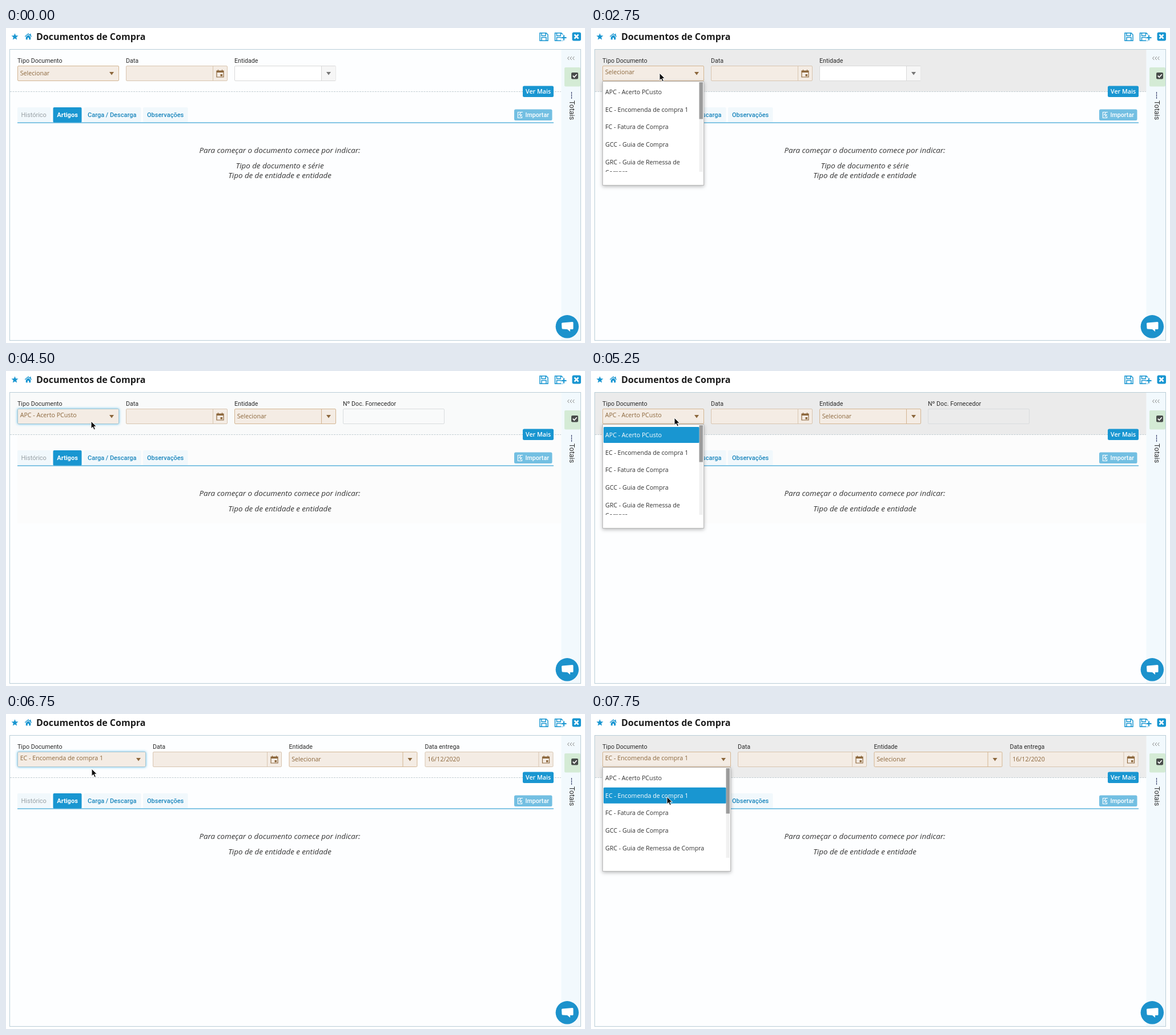
An HTML page that plays this animation: 1014x552 px, repeating every 8000 ms.

```html
<!DOCTYPE html>
<html lang="pt">
<head>
<meta charset="utf-8">
<title>Documentos de Compra</title>
<style>
html, body { margin: 0; width: 100%; height: 100%; overflow: hidden; background: #fff; }
svg { display: block; width: 1014px; height: 552px; }
text { font: 10.66px "Open Sans", "Noto Sans", sans-serif; white-space: pre; }
.label { font-family: Roboto, sans-serif; fill: #2b2b2b; }
.tab { font: 500 11px Roboto, sans-serif; fill: #1a86bd; }
.title { font-weight: 700; font-size: 16px; fill: #1c1c1c; }
.hint { font-style: italic; font-size: 13.33px; fill: #333; text-anchor: middle; }
.btn { font-weight: 600; fill: #fff; }
.side { font: 12.44px Roboto, sans-serif; fill: #333; }
</style>
</head>
<body>
<svg id="stage" viewBox="0 0 1014 552">
  <defs>
    <filter id="shadow" x="-10%" y="-10%" width="120%" height="120%">
      <feDropShadow dx="0" dy="2" stdDeviation="3" flood-opacity=".28"/>
    </filter>
    <filter id="glow" x="-10%" y="-40%" width="120%" height="180%">
      <feDropShadow dx="0" dy="0" stdDeviation="2.2" flood-color="#3aaee6" flood-opacity=".85"/>
    </filter>
    <clipPath id="listClip"><rect x="20" y="94" width="230" height="158"/></clipPath>
  </defs>
  <g id="scene"></g>
</svg>
<script>
const scene = document.getElementById('scene');
const LOOP = 8000, STEP = 250;
const BLUE = '#1996d1', TAN = '#f4ece4', TAN_LINE = '#d3b592', BROWN = '#8c673c';

// time, x, y of the pointer tip
const pointerKeys = [
  [500, 285, 0], [1000, 150, 82], [1500, 87, 146], [2000, 87, 146], [2750, 120, 79],
  [3250, 119, 81], [3750, 114, 112], [4000, 115, 112], [4500, 149, 88], [4750, 149, 88],
  [5250, 146, 82], [5750, 130, 143], [6000, 131, 143], [6500, 150, 96], [6750, 150, 96],
  [7250, 146, 83], [7750, 133, 145]
];
// time, strength of the header shade
const shadeKeys = [
  [2000, 0], [2750, 1], [3250, 1], [3750, 0], [4000, 0], [4500, .28], [5000, 1],
  [5250, 1], [5750, 0], [6250, .3], [6750, 0], [7250, 1], [7500, 1], [7750, .92]
];

function track(keys, t) {
  if (t <= keys[0][0]) return keys[0].slice(1);
  for (let i = 1; i < keys.length; i++) {
    const a = keys[i - 1], b = keys[i];
    if (t <= b[0]) {
      const k = (t - a[0]) / (b[0] - a[0]);
      return a.slice(1).map((v, j) => v + (b[j + 1] - v) * k);
    }
  }
  return keys[keys.length - 1].slice(1);
}

const rect = (x, y, w, h, fill, extra = '') =>
  `<rect x="${x}" y="${y}" width="${w}" height="${h}" fill="${fill}" ${extra}/>`;
const text = (x, y, str, cls = '', fill = '') =>
  `<text x="${x}" y="${y}" class="${cls}" ${fill && `fill="${fill}"`}>${str}</text>`;
const path = (d, fill, extra = '') => `<path d="${d}" fill="${fill}" ${extra}/>`;
const line = (d, color, w = 1, extra = '') =>
  path(d, 'none', `stroke="${color}" stroke-width="${w}" ${extra}`);
const arrow = (x, y, color) => path(`M${x - 4} ${y - 2.5}h8l-4 5.5z`, color);

function calendar(x, y) {
  return line(`M${x - 6} ${y - 5}h12v11h-12zM${x - 3.5} ${y - 7}v2M${x + 3.5} ${y - 7}v2`, BROWN, 1.2) +
    rect(x - 6, y - 5, 12, 3, BROWN) + rect(x + .5, y + 1, 3.5, 3.5, BROWN);
}

function field(x, w, label, o = {}) {
  const fill = o.fill || TAN, edge = o.edge || TAN_LINE;
  const right = x + w, ink = o.ink || BROWN;
  let s = text(x, 60.5, label, 'label');
  s += rect(x + .5, 66.5, w - 1, 26, fill, `rx="1.5" stroke="${edge}" ${o.glow ? 'filter="url(#glow)"' : ''}`);
  if (o.button) {
    if (o.buttonFill) s += rect(right - 25.5, 67, 25, 25, o.buttonFill);
    s += line(`M${right - 25.5} 67v25`, edge);
  }
  if (o.icon === 'date') s += calendar(right - 13, 80);
  if (o.icon === 'arrow') s += arrow(right - 13, 79.5, ink);
  if (o.value) s += text(x + 4.7, o.baseline || 83, o.value, '', ink);
  return s;
}

function disk(x) {
  return line(`M${x} 8.7h11l3 3v10.6h-14zM${x + 3} 9v4.5h7v-4.5M${x + 3} 22v-5.5h8v5.5`, BLUE, 1.5);
}

function topBar() {
  const star = Array.from({ length: 10 }, (_, i) => {
    const a = i * Math.PI / 5, r = i % 2 ? 2.7 : 6.3;
    return (15.5 + r * Math.sin(a)).toFixed(1) + ' ' + (15.5 - r * Math.cos(a)).toFixed(1);
  }).join('L');
  return path(`M${star}z`, BLUE) +
    path('M39 9.3l6.2 5.3-.9 1-5.3-4.5-5.3 4.5-.9-1zM39 12.2l4.2 3.5v4.6h-3v-3.2h-2.4v3.2h-3v-4.6zM42 10h1.6v3.2l-1.6-1.4z', BLUE) +
    text(53, 21, 'Documentos de Compra', 'title') +
    disk(935) + disk(961.5) +
    rect(972, 11.5, 9.5, 11, '#fff') + line('M977 12.5v9M972.5 17h9', BLUE, 2) +
    rect(991.5, 7.5, 15.5, 15, BLUE, 'rx="3"') + line('M995.5 11.5l7 7m0-7l-7 7', '#fff', 2.5);
}

function sidePanel() {
  const chevrons = [983.5, 988, 992.5].map(x => `M${x + 2.8} 50l-2.8 3 2.8 3`).join('');
  return rect(972.5, 38, 33.5, 509, '#f2f9fd') +
    line(chevrons, '#777', .9) +
    rect(978, 69, 28, 33.5, '#d4ebd5', 'rx="2"') +
    rect(990, 78, 12, 11.5, '#484d4a', 'rx="2"') + line('M992.7 83.7l2.5 2.5 4.5-5', '#fff', 1.7) +
    line('M990.5 112v12', '#3c4570', 1.2, 'stroke-dasharray="3.4 .9"') +
    `<text class="side" transform="translate(986.5 127) rotate(90)">Totais</text>`;
}

function tab(x, w, label, tx) {
  return rect(x, 139, w, 26.5, '#f1f8fc', 'rx="2"') +
    text(tx, 156, label, 'tab" style="' + (label === 'Histórico' ? 'fill:#98a0a5;font-weight:400' : ''));
}

function body(hints) {
  return line('M7 111.5H972', '#c3ced3', 1, 'stroke-dasharray="3 1.5"') +
    rect(905, 101.5, 54, 19.5, BLUE, 'rx="2.5"') + text(910, 115, 'Ver Mais', 'btn') +
    tab(20, 58, 'Histórico', 26.5) + tab(136, 100.5, 'Carga / Descarga', 143) +
    tab(240, 78.5, 'Observações', 247) +
    rect(82.5, 139, 50, 27, BLUE, 'rx="2"') +
    text(89.3, 156, 'Artigos', 'tab" style="fill:#fff;font-weight:700') +
    line('M20 166H959', '#5db3dc', 1.6) +
    rect(890, 142.5, 66.5, 19.5, '#73bfe2', 'rx="2.5"') +
    line('M901 147.5h-4.5v10h7v-3M905 147.5h-3l-3 4.5h4l-3 3.5', '#fff', 1.2) +
    text(909.5, 156, 'Importar', 'label" style="fill:#fff;font-weight:500') +
    text(479.5, 219, 'Para começar o documento comece por indicar:', 'hint') +
    hints.map((h, i) => text(479.5, 245.5 + i * 17.8, h, 'hint')).join('');
}

function list(w, picked, hovered) {
  const wide = w > 200, bar = 20 + w - 8.5;
  const items = ['APC - Acerto PCusto', 'EC - Encomenda de compra 1', 'FC - Fatura de Compra',
    'GCC - Guia de Compra', 'GRC - Guia de Remessa de' + (wide ? ' Compra' : '')];
  let s = rect(20.5, 93.5, w - 1, 182, '#fff', 'stroke="#b9b9b9" filter="url(#shadow)"');
  s += rect(bar, 95, 6.5, 157, '#f1f1f1') + rect(bar, 95, 6.5, wide ? 79.5 : 64.5, '#9c9c9c');
  items.forEach((name, i) => {
    const mark = i === picked ? BLUE : i === hovered ? '#999' : '';
    if (mark) s += rect(22, 98 + i * 30.8, bar - 22, 28, mark, 'rx="1.5"');
    s += text(25, 115.8 + i * 30.7, name, '', mark ? '#fff' : '#333');
  });
  if (!wide) s += `<g clip-path="url(#listClip)">${text(25, 257, 'Compra', '', '#333')}</g>`;
  return s;
}

function pointer(x, y) {
  return `<g transform="translate(${x} ${y})">` +
    path('M0 0v13l3-2.8 2 4.8 2.4-1-2-4.7h4z', '#111', 'stroke="#fff" stroke-width="1"') + '</g>';
}

function fields(t, doc, open) {
  const wide = t >= 6500, loaded = t >= 4250, w = wide ? 225 : 178;
  const tan = { button: true, ink: BROWN };
  let s = field(20, w, 'Tipo Documento', {
    value: doc, icon: 'arrow', baseline: t >= 2500 ? 81 : 83,
    glow: t >= 4000 && !open, edge: t >= 4000 && !open ? '#a9c6cf' : TAN_LINE
  });
  const choose = { ...tan, icon: 'arrow', value: 'Selecionar' };
  const date = { ...tan, icon: 'date', edge: '#d8c5b0' };
  if (wide) {
    return s + field(257, 226, 'Data', date) + field(495.5, 225, 'Entidade', choose) +
      field(733.5, 225, 'Data entrega', { ...date, value: '16/12/2020' });
  }
  s += field(210, 178, 'Data', date);
  if (!loaded) {
    return s + field(400, 178, 'Entidade',
      { fill: '#fff', edge: '#d9d9d9', button: true, buttonFill: '#f6f6f6', icon: 'arrow', ink: '#777' });
  }
  return s + field(400, 178, 'Entidade', choose) +
    field(590, 178, 'Nº Doc. Fornecedor', { fill: 'none', edge: '#d9dcde' });
}

function draw(t) {
  const open = t >= 2500 && t < 4000 || t >= 5000 && t < 6000 || t >= 7250;
  const doc = t < 4000 ? 'Selecionar' : t < 6000 ? 'APC - Acerto PCusto' : 'EC - Encomenda de compra 1';
  const picked = t < 4000 ? -1 : t < 6000 ? 0 : 1;
  const hovered = t >= 5500 && t < 6000 ? 1 : t >= 3500 && t < 4000 ? 0 : -1;
  const hints = ['Tipo de de entidade e entidade'];
  if (t < 4250) hints.unshift('Tipo de documento e série');
  const [shade] = track(shadeKeys, t);

  let s = topBar() + rect(6.5, 37.5, 1000, 510, '#fdfeff', 'stroke="#b9cdd7"') + sidePanel();
  if (t >= 4250 && t < 6500) s += rect(20, 112, 952, 155, '#fcfcfc');
  s += rect(7, 38, 965.5, 73.5, '#ebebeb', `opacity="${shade}"`);
  s += body(hints) + fields(t, doc, open);
  if (open) s += list(t >= 6500 ? 225 : 178, picked, hovered);
  s += `<circle cx="982.8" cy="523.3" r="20.2" fill="#1c92cc"/>` +
    path('M974.5 516.5l17.5-1.5q1.5 0 1.5 1.5v10q0 1.5-1.5 1.5h-4v4l-5-4-8-.5q-1.5 0-1.5-1.5l-.5-8q0-1.5 1.5-1.5z', '#fff');
  if (t >= 500) s += pointer(...track(pointerKeys, t));
  scene.innerHTML = s;
}

const start = performance.now();
let last = -1;
function tick() {
  const t = Math.floor((performance.now() - start) % LOOP / STEP) * STEP;
  if (t !== last) draw(last = t);
  requestAnimationFrame(tick);
}
tick();
</script>
</body>
</html>
```
